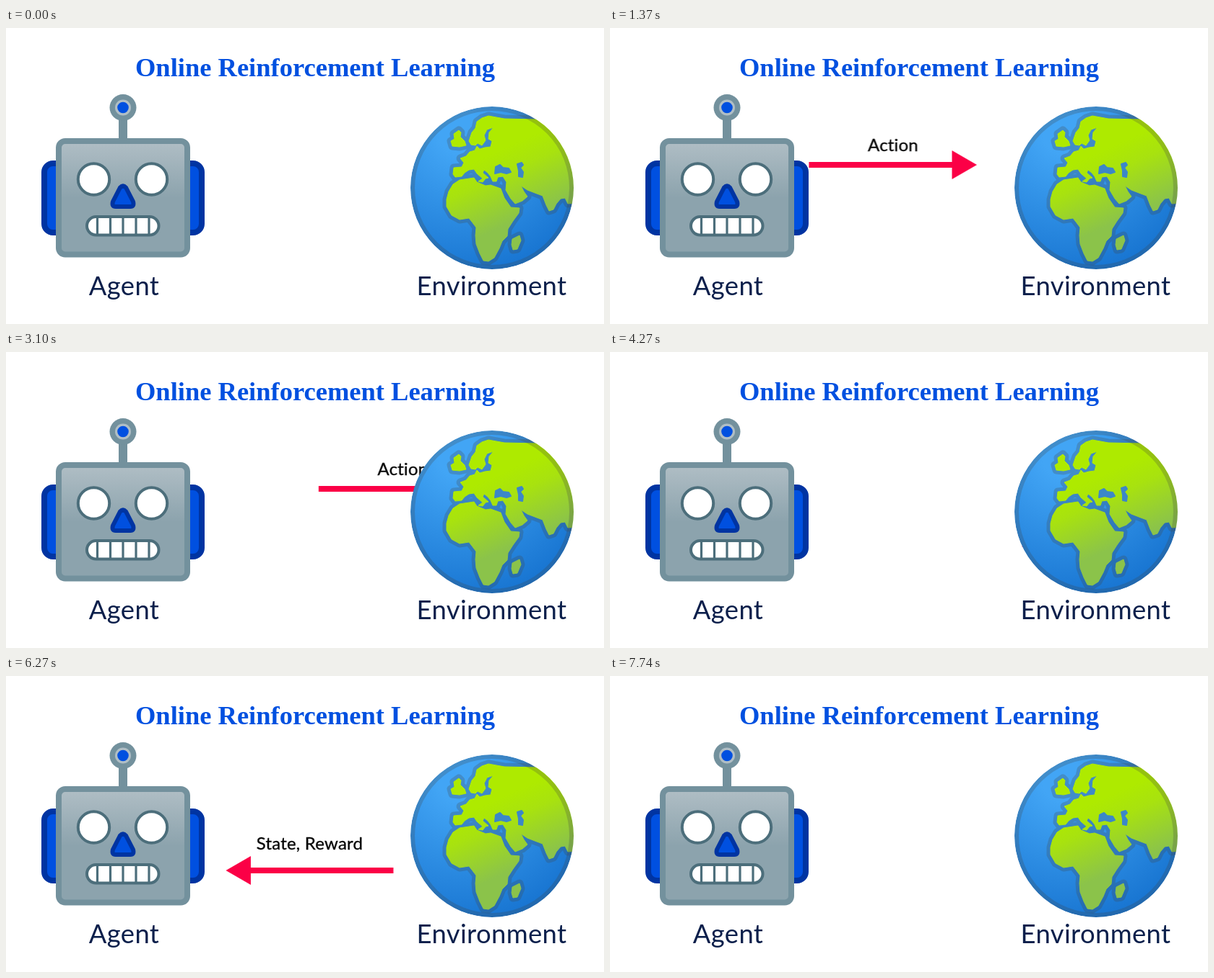
These frames come from a looping animation (828x411 px, 8000 ms). An HTML page:

```html
<!DOCTYPE html>
<html lang="en">
<head>
<meta charset="utf-8">
<title>Online Reinforcement Learning</title>
<style>
  html, body { margin: 0; width: 100%; height: 100%; overflow: hidden; background: #fff; }
  svg { display: block; width: 828px; height: 411px; }
  .title { font: bold 36.5px "Liberation Serif", serif; fill: #0050e0; }
  .label { font: 36.4px Lato, sans-serif; letter-spacing: .4px; fill: #0b1f4b; }
  .message {
    font: 24px Lato, sans-serif; letter-spacing: .2px; font-variant-ligatures: none;
    stroke: #000; stroke-width: .3;
  }
  text { text-anchor: middle; }
  .arrow { fill: #fb0046; }
  .action, .reply { animation: 8s infinite cubic-bezier(.364, 0, .636, 1); }
  .action { animation-name: action; }
  .reply { animation-name: reply; }
  @keyframes action {
    0% { transform: translateX(-283px); }
    21.875%, 28.125% { transform: translateX(0); }
    50%, 100% { transform: translateX(263px); }
  }
  @keyframes reply {
    0%, 50% { transform: translateX(282px); }
    71.875%, 78.125% { transform: translateX(0); }
    100% { transform: translateX(-282px); }
  }
  .ear, .nose { fill: #0050e0; stroke: #0034a2; }
  .metal { fill: #73919d; }
  .face { fill: #fff; stroke: #4c6e7b; stroke-width: 4; }
  .globe { stroke-linejoin: round; }
  .coast { fill: #424242; stroke: #424242; stroke-width: 11; opacity: .24; }
  .land { fill: url(#green); stroke: url(#green); stroke-width: 1; }
  .sea { fill: #3c87c8; stroke: #3c87c8; stroke-width: 2; }
  .rim { fill: none; stroke: #424242; stroke-opacity: .24; stroke-width: 6; }
</style>
</head>
<body>
<svg viewBox="0 0 828 411">
  <defs>
    <linearGradient id="steel" x1="0" y1="0" x2="0" y2="1">
      <stop offset="0" stop-color="#b0bec5"/>
      <stop offset=".5" stop-color="#8ca3ad"/>
    </linearGradient>
    <radialGradient id="ocean" gradientUnits="userSpaceOnUse" cx="628" cy="145" r="195">
      <stop offset=".15" stop-color="#42a5f5"/>
      <stop offset="1" stop-color="#1976d2"/>
    </radialGradient>
    <linearGradient id="green" gradientUnits="userSpaceOnUse" x1="660" y1="180" x2="705" y2="280">
      <stop offset="0" stop-color="#aeea00"/>
      <stop offset=".3" stop-color="#a8e20f"/>
      <stop offset=".9" stop-color="#8bc34a"/>
    </linearGradient>
    <clipPath id="lane"><rect x="100" y="140" width="600" height="160"/></clipPath>
    <clipPath id="disc"><circle cx="673" cy="222" r="113"/></clipPath>
    <g id="continents">
      <path d="M641 157 L645 145 650 139 652 130 659 125 668 122 690 126 735 127 790 127 790 243 778 244
        774 236 768 237 762 244 758 252 752 254 748 246 743 233 735 230 722 225 713 219
        717 227 722 234 715 240 705 244 699 237 692 225 693 214 688 206 681 207 679 213 674 213 671 206 667 201
        662 197 660 201 668 208 664 209 660 214 654 213 660 209 652 202 648 196 641 197 635 201 631 206 622 207
        619 203 620 194 631 193 634 187 629 181 637 178 642 172 649 170 652 164 656 168 663 166 671 165 673 157
        668 154 669 145 675 138 666 141 662 149 664 156 659 163 653 160 650 163 644 162 Z"/>
      <path d="M613 227 L619 217 628 211 648 208 652 214 664 219 671 218 685 223 690 236 699 249 711 250
        710 257 702 268 695 279 694 289 687 296 683 306 676 319 668 324 661 323 656 313 651 300 650 288
        651 277 645 269 641 264 628 266 617 260 610 248 610 238 Z"/>
      <path d="M701 293 L711 288 713 295 708 307 702 308 700 301 Z"/>
      <path d="M620 147 L627 142 630 145 629 151 635 157 637 163 628 165 618 164 616 157 621 154 Z"/>
    </g>
  </defs>

  <rect width="828" height="411" fill="#fff"/>
  <text class="title" x="428" y="67">Online Reinforcement Learning</text>

  <g clip-path="url(#lane)">
    <g class="action">
      <text class="message" x="423.5" y="171">Action</text>
      <path class="arrow" d="M307 186 H505 V170 L539.5 190 505 210 V194 H307 Z"/>
    </g>
    <g class="reply">
      <text class="message" x="420.5" y="241">State, Reward</text>
      <path class="arrow" d="M536.5 266 H339 V250 L304.5 270 339 290 V274 H536.5 Z"/>
    </g>
  </g>

  <g class="robot">
    <g class="ear" stroke-width="8">
      <rect x="53" y="188" width="40" height="96" rx="12"/>
      <rect x="231" y="188" width="40" height="96" rx="12"/>
    </g>
    <rect class="metal" x="156" y="124" width="12" height="32"/>
    <circle class="metal" cx="162" cy="110.5" r="18.5"/>
    <circle cx="162" cy="110.5" r="11" fill="#b0bec5"/>
    <circle cx="162" cy="110.5" r="7.8" fill="#0050e0"/>
    <rect x="73" y="157" width="178" height="157.5" rx="9" fill="url(#steel)" stroke="#73919d" stroke-width="8"/>
    <g class="face">
      <circle cx="121.5" cy="210" r="21.7"/>
      <circle cx="201.5" cy="210" r="21.7"/>
      <rect x="112" y="262" width="99.5" height="25.5" rx="12.75"/>
      <path d="M126.5 262 V287 M144.5 262 V287 M162 262 V287 M180 262 V287 M198 262 V287" stroke-width="3.2"/>
    </g>
    <path class="nose" stroke-width="6" stroke-linejoin="round"
      d="M158 221.5 Q162 217.5 166 221.5 L176 241 Q178 248 172 248 H152 Q146 248 148 241 Z"/>
  </g>

  <g class="globe" clip-path="url(#disc)">
    <circle cx="673" cy="222" r="113" fill="url(#ocean)"/>
    <use href="#continents" class="coast"/>
    <use href="#continents" class="land"/>
    <g class="sea">
      <path d="M678 193 L684 190 688 194 696 195 699 200 693 202 685 200 677 202 Z"/>
      <path d="M708 189 L714 187 716 190 712 194 716 200 715 207 710 206 710 198 Z"/>
    </g>
    <circle class="rim" cx="673" cy="222" r="110"/>
  </g>

  <text class="label" x="163.5" y="371">Agent</text>
  <text class="label" x="672.5" y="371">Environment</text>
</svg>
</body>
</html>
```
